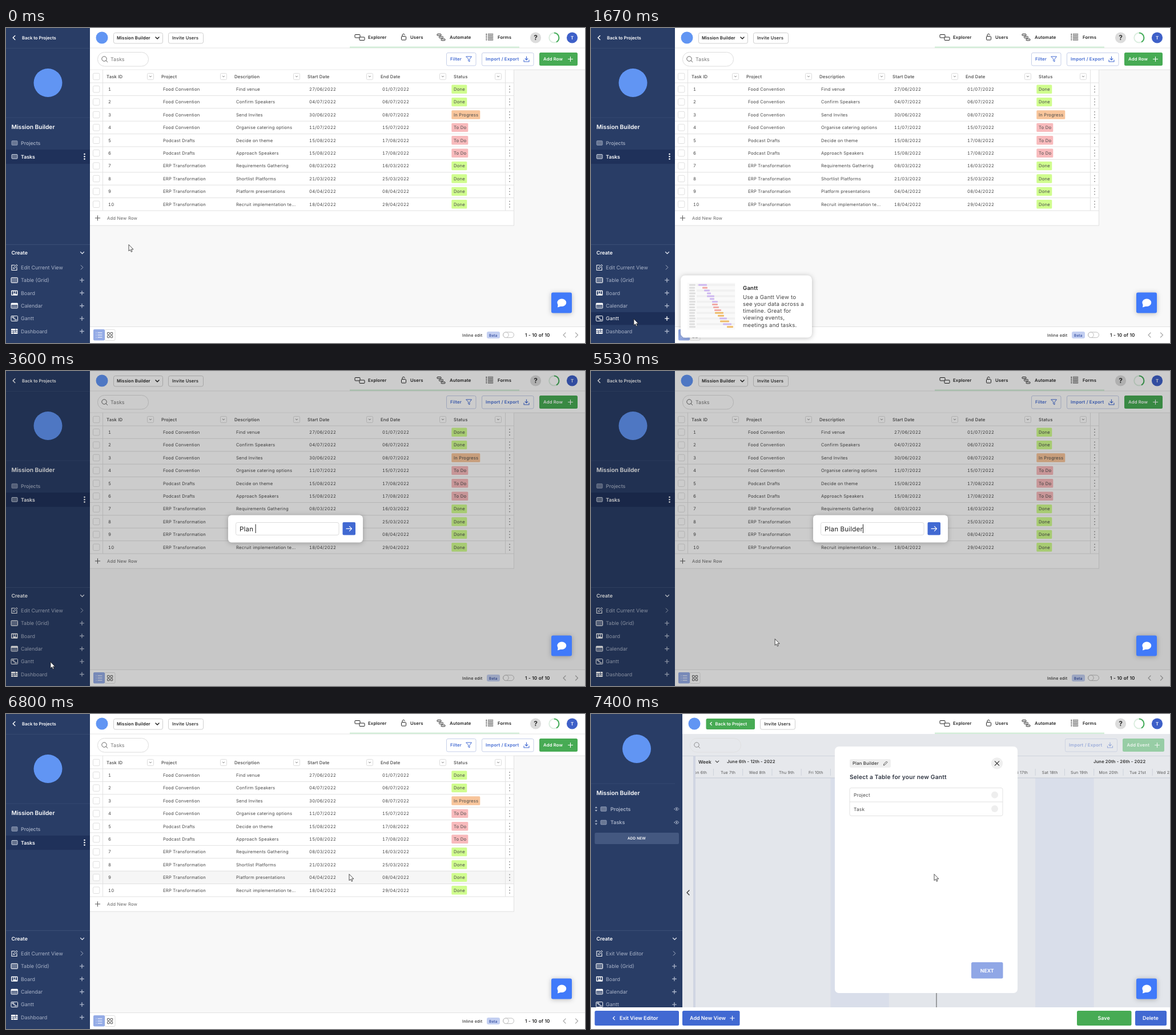
Animation, 1014 px wide and 552 px high, one loop 9070 ms. Source, as an HTML page:

```html
<!DOCTYPE html>
<html lang="en">
<head>
<meta charset="utf-8">
<title>Create a Gantt view</title>
<style>
html, body { margin: 0; width: 100%; height: 100%; overflow: hidden; background: #f8f8f8; }
svg { display: block; width: 1014px; height: 552px; }
text { font-family: Inter, "Liberation Sans", sans-serif; white-space: pre; text-rendering: geometricPrecision; }
.num { font-variant-numeric: tabular-nums; }
.shadow { filter: drop-shadow(0 1px 4px rgba(0, 0, 0, .25)); }
.item { color: #a9b3c8; }
.item.on { color: #fff; }
</style>
</head>
<body>
<svg id="stage" viewBox="0 0 1014 552"></svg>
<script>
const LOOP = 9070, STEP = 200 / 3;
const NAVY = '#293d66', BLUE = '#4169d2', GREEN = '#47ab54', PALE = '#a9b3c8', LINE = '#e2e2e2';
const BRAND = '#6195f3', APP = 'Mission Builder', TYPED = 'Plan Builder';

// Drawing helpers
const text = (x, y, s, size = 7.68, weight = 400, fill = '#484848', ls = .19, anchor = 'start', more = '') =>
  `<text x="${x}" y="${y}" font-size="${size}" font-weight="${weight}" fill="${fill}" letter-spacing="${ls}" text-anchor="${anchor}" ${more}>${s}</text>`;
const rect = (x, y, w, h, fill, r = 0, stroke = 'none', more = '') =>
  `<rect x="${x}" y="${y}" width="${w}" height="${h}" rx="${r}" fill="${fill}" stroke="${stroke}" ${more}/>`;
const circle = (x, y, r, fill, stroke = 'none', more = '') =>
  `<circle cx="${x}" cy="${y}" r="${r}" fill="${fill}" stroke="${stroke}" ${more}/>`;
const path = (d, stroke = '#444', w = 1, fill = 'none') =>
  `<path d="${d}" stroke="${stroke}" stroke-width="${w}" fill="${fill}" stroke-linecap="round" stroke-linejoin="round"/>`;
const group = (body, attrs = '') => `<g ${attrs}>${body}</g>`;
const plus = (x, y, r, c, w = 1.2) => path(`M${x - r} ${y}h${2 * r}M${x} ${y - r}v${2 * r}`, c, w);
const down = (x, y, r, c, w = 1.2) => path(`M${x - r} ${y - r / 2}l${r} ${r}l${r} ${-r}`, c, w);
const side = (x, y, r, dir, c, w = 1.2) => path(`M${x - dir * r / 2} ${y - r}l${dir * r} ${r}l${-dir * r} ${r}`, c, w);
const dots = (x, y, gap, r, c) => [-gap, 0, gap].map(d => circle(x, y + d, r, c)).join('');
const vline = (x, y1, y2, c = LINE) => rect(x, y1, 1, y2 - y1, c);
const hline = (x1, x2, y, c = LINE) => rect(x1, y, x2 - x1, 1, c);
const tray = (x, y, c) => path(`M${x} ${y - 4.5}v6m-2.4 -2.4l2.4 2.4l2.4 -2.4M${x - 4.5} ${y + 1.5}v3h9v-3`, c, 1.1);
const search = x => rect(x + .5, 42.5, 89, 24.5, 'none', 12, '#dcdcdc') +
  circle(x + 12, 54, 4.2, 'none', '#666', 'stroke-width="1"') + path(`M${x + 15.2} 57.2l2.6 2.6`, '#666');
const tableIcon = (x, y, w, h, c) => rect(x, y - h / 2, w, h, 'rgba(255,255,255,.3)', 1, c);

function navBar() {
  const ink = '#222';
  const label = (x, s) => text(x, 19.3, s, 7.68, 600, ink);
  return rect(602, 32.5, 297, 2.5, '#d3edd8') +
    rect(611, 11.5, 9, 5.5, 'none', 1, ink) + rect(619, 16, 9, 5.5, '#fff', 1, ink) + label(634, 'Explorer') +
    rect(692.5, 14.5, 8, 6.5, 'none', 1.2, ink) + path('M694 14.5v-2a2.2 2.2 0 0 1 4.3 -.6', ink) + label(708, 'Users') +
    rect(755, 10.5, 7, 2.8, 'none', 1, ink) + rect(758.5, 14.8, 7, 2.8, 'none', 1, ink) +
    rect(762, 19.1, 7, 2.8, 'none', 1, ink) + label(777, 'Automate') +
    [11, 14.2, 17.4, 20.6].map(y => circle(841.3, y, .9, ink) + rect(844, y - .9, 9, 1.8, '#fff', .9, ink, 'stroke-width=".6"')).join('') +
    label(861, 'Forms') +
    circle(927.5, 17, 9.6, '#dcdcdc') + text(927.5, 21.2, '?', 12, 700, '#333', 0, 'middle') +
    circle(959.8, 17, 8.6, 'none', '#dceee0', 'stroke-width="2"') +
    circle(959.8, 17, 8.6, 'none', '#45ad5a', 'stroke-width="2" pathLength="100" stroke-dasharray="42 100" transform="rotate(-90 959.8 17)"') +
    circle(991.5, 17, 9.6, '#3e60c8') + text(991.5, 19.8, 'T', 7.8, 600, '#fff', 0, 'middle');
}

const createIcons = [
  y => path(`M15 ${y - 4}h-5v9h9v-5`, '#fff', 1.1) + path(`M13 ${y + 2}l.4 -2l5 -5l1.7 1.7l-5 5z`, '#fff', 1),
  y => tableIcon(9, y, 11.5, 9, '#fff'),
  y => rect(9, y - 4.5, 11.5, 9, '#fff', 1) + rect(10.3, y - 3, 2.2, 6, NAVY) + rect(13.6, y - 3, 2.2, 4, NAVY) + rect(16.9, y - 3, 2.2, 5, NAVY),
  y => rect(9, y - 4.5, 11.5, 9, 'none', 1, '#fff') + rect(9, y - 4.5, 11.5, 3, '#fff') +
    [0, 1].map(j => [0, 1, 2, 3].map(i => rect(10.5 + i * 2.4, y - .2 + j * 2.2, 1.4, 1.2, '#fff')).join('')).join(''),
  y => rect(9, y - 4.5, 11.5, 9, 'none', 1, '#fff') + path(`M10.8 ${y - 2.3}h3M12.8 ${y}h3M15.5 ${y + 2.3}h3`, '#fff', 1.4),
  y => rect(9, y - 4.5, 11.5, 9, '#fff', 1) + path(`M9.5 ${y - 1}h10.5M9.5 ${y + 1.7}h10.5M13 ${y - 1}v5M16.5 ${y - 4}v5`, NAVY, .8)
];
function createList(first, right) {
  const names = [first, 'Table (Grid)', 'Board', 'Calendar', 'Gantt', 'Dashboard'];
  return hline(0, right + 14, 379, '#3b4f76') + text(9.5, 397, 'Create', 8.8, 600, '#fff', 0) +
    group(down(right + .5, 394, 3, '#dfe4ee'), 'class="sr"') +
    names.map((s, i) => {
      const y = 419.5 + i * 22.4;
      const mark = i ? plus(right, y, 3.3, 'currentColor', 1.4) : side(right, y, 3.6, 1, 'currentColor', 1);
      return group(createIcons[i](y) + text(26, y + 3.2, s, 8.96, 400, 'currentColor', 0) + group(mark, 'class="sr"'), 'class="item"');
    }).join('');
}

function tableView() {
  const F = 'Food Convention', P = 'Podcast Drafts', E = 'ERP Transformation';
  const rows = [
    [F, 'Find venue', '27/06', '01/07', 0], [F, 'Confirm Speakers', '04/07', '06/07', 0],
    [F, 'Send Invites', '30/06', '08/07', 1], [F, 'Organise catering options', '11/07', '15/07', 2],
    [P, 'Decide on theme', '15/08', '17/08', 2], [P, 'Approach Speakers', '15/08', '17/08', 2],
    [E, 'Requirements Gathering', '08/03', '16/03', 0], [E, 'Shortlist Platforms', '21/03', '25/03', 0],
    [E, 'Platform presentations', '04/04', '08/04', 0], [E, 'Recruit implementation te...', '18/04', '29/04', 0]
  ];
  const chips = [['Done', 27, '#d0fd8e'], ['In Progress', 50, '#f8c59b'], ['To Do', 29, '#f8babc']];
  const heads = [[176, 'Task ID', 253], [272, 'Project', 381], [400, 'Description', 509],
    [528, 'Start Date', 637], [656, 'End Date', 765], [784, 'Status', 862]];
  const box = y => rect(152.5, y - 5.7, 11.4, 11.4, '#fff', 2, '#dedede');

  let s = rect(147, 0, 867, 552, '#f8f8f8') + rect(147, 0, 867, 73, '#fff') + hline(147, 1014, 34.5, '#e6e6e6') + hline(147, 1014, 72.7);
  // Top bar and toolbar
  s += circle(168, 17, 10.5, BRAND) + rect(188.5, 8.5, 86, 18.5, '#fff', 3, '#cfcfcf') + text(194, 20.4, APP, 7.68, 600, '#222', .12) +
    down(265, 17.5, 3, '#222', 1.5) + rect(284.5, 8.5, 61, 18.5, '#fff', 3, '#cfcfcf') + text(291, 20.4, 'Invite Users', 7.68, 600, '#333') +
    navBar() + search(160) + text(183, 57.5, 'Tasks', 8.96, 400, '#777', 0) +
    rect(771.5, 43.5, 51.5, 22.5, '#fff', 2.5, '#c6cfe9') + text(778, 57, 'Filter', 7.68, 600, BLUE) +
    path('M806 50h9.5l-3.6 4.6v4.4l-2.2 -1.4v-3z', BLUE) +
    rect(833.5, 43.5, 90.5, 22.5, '#fff', 2.5, '#c6cfe9') + text(840, 57, 'Import / Export', 7.68, 600, BLUE) + tray(911.5, 54.5, BLUE) +
    rect(934, 43, 67, 23, GREEN, 2.5) + text(941, 57, 'Add Row', 7.68, 600, '#fff') + plus(988.5, 54.5, 4, '#fff', 1.1);
  // Grid
  s += rect(147, 73.5, 743, 272.5, '#fff') + rect(147, 96, 743, 22.4, '#f6f6f6', 0, 'none', 'id="rowHover"') + box(85);
  s += heads.map(([x, h, d]) => text(x, 87.8, h, 7.68, 500, '#444') +
    rect(d - 5.5, 79.5, 11, 11, '#fff', 2, '#dcdcdc') + down(d, 85, 1.6, '#777', 1)).join('');
  rows.forEach(([p, d, a, b, st], i) => {
    const y = 107.2 + i * 22.4, [name, w, c] = chips[st];
    const nums = text(179, y + 2.8, i + 1) + text(531, y + 2.8, a + '/2022') + text(659, y + 2.8, b + '/2022');
    s += hline(147, 890, y - 11.7) + box(y) + group(nums, 'class="num"') + text(275, y + 2.8, p) + text(403, y + 2.8, d) +
      rect(780.3, y - 7.7, w, 15.4, c, 1.5) + text(784, y + 2.8, name, 7.68, 400, '#4d4d4d') + dots(882, y, 5, 1, '#999');
  });
  s += hline(147, 890, 319.6) + hline(147, 890, 345.6) + vline(169, 73, 320) + vline(874, 73, 320) + vline(889, 73, 346) +
    plus(160.5, 333, 4.2, '#555', 1) + text(177, 336, 'Add New Row', 7.68, 400, '#666');
  // Footer
  s += rect(147, 523, 867, 29, '#fff') + hline(147, 1014, 523) + rect(173, 528.5, 18, 19, '#fff', 2, '#e0e0e0') +
    rect(153, 528, 20, 19.5, '#94abe6', 2) + path('M161 534h7M161 538h7M161 542h7M158 534h.1M158 538h.1M158 542h.1', '#fff', 1.2) +
    [[177.5, 533.5], [183, 533.5], [177.5, 539], [183, 539]].map(([x, y]) => rect(x, y, 3.7, 3.7, 'none', .5, '#444', 'stroke-width=".9"')).join('') +
    text(799, 540.6, 'Inline edit', 7.2, 500, '#333') + rect(842, 532, 23, 12, '#c3cff1', 3) + text(846, 540.5, 'Beta', 6.4, 600, '#3c55a5') +
    rect(870.5, 533, 19, 9.6, '#fff', 4.8, '#bdbdbd') + circle(875.5, 537.8, 4.7, '#fff', '#bdbdbd') +
    text(909, 541, '1 - 10 of 10', 8.2, 600, '#222') + side(978, 538, 4, -1, '#aaa') + side(999.5, 538, 4, 1, '#aaa');
  // Sidebar
  s += rect(0, 0, 147, 552, NAVY) + side(14, 17, 3.6, -1, '#fff', 1.4) + text(28, 20.2, 'Back to Projects', 7.68, 600, '#fff', 0) +
    hline(0, 147, 35, '#344970') + circle(73.5, 96, 25, BRAND) + hline(0, 147, 156.5, '#344970') +
    text(9.5, 177, APP, 10.24, 600, '#fff', 0) + rect(0, 213, 147, 25, '#1f315a') +
    tableIcon(10, 201.5, 10, 7.5, '#8e9bb6') + text(26, 204.8, 'Projects', 8.8, 500, PALE, 0) +
    tableIcon(10, 225.3, 10, 7.5, '#c9d1e0') + text(26, 228.5, 'Tasks', 8.8, 600, '#fff', 0) + dots(137.5, 225.3, 4.3, 1.3, '#fff') +
    rect(0, 498, 147, 22.4, '#1d2f57', 0, 'none', 'id="sideHover"') + createList('Edit Current View', 133);
  return s;
}

function hoverCard() {
  const tone = { p: '#ceb8f0', r: '#f1aaa6', o: '#efbc68' };
  const kinds = 'prppppprrroopopo', starts = [188, 195, 198, 203, 203, 208, 212, 212, 214, 216, 217, 222, 225, 226, 231, 238];
  const lens = [15, 9, 10, 7, 13, 8, 10, 10, 10, 12, 15, 11, 13, 16, 15, 11];
  const bars = starts.map((x, i) => {
    const y = 448.8 + i * 4.9;
    return rect(172, y, i % 3 ? 10 : 11, 3, '#dedede', 1) + rect(185, y - .4, 67, 3.8, i % 2 ? '#f9f9f9' : '#f1f1f1') +
      rect(x, y, lens[i], 3, tone[kinds[i]], 1);
  }).join('');
  const lines = ['Use a Gantt View to', 'see your data across a', 'timeline. Great for', 'viewing events,', 'meetings and tasks.'];
  return rect(157, 433.5, 230, 109, '#fff', 8, 'none', 'class="shadow"') + rect(169, 446.5, 83.5, 82, '#fafafa') + bars +
    text(266, 459.3, 'Gantt', 9.6, 600, '#222') + lines.map((l, i) => text(266, 474.5 + i * 12.25, l, 9.6, 400, '#444')).join('');
}

function nameDialog() {
  return rect(0, 0, 1014, 552, '#000', 0, 'none', 'opacity=".2"') +
    rect(389, 252.5, 236, 48, '#fff', 6, 'none', 'class="shadow"') + rect(402.5, 265.5, 180.5, 22, '#fff', 3, '#dcdcdc') +
    text(409, 280.5, '', 11.52, 400, '#333', .19, 'start', 'id="typed"') +
    rect(409, 268.5, 1, 15.5, '#222', 0, 'none', 'id="caret"') +
    rect(589.5, 265, 22.5, 22.5, BLUE, 2, 'none', 'id="go"') + path('M596 276.3h9.5m-4 -4l4 4l-4 4', '#fff', 1.2);
}

function editorView() {
  const day = d => 240 + (d - 7) * 51.25, week = 'Mon Tue Wed Thu Fri Sat Sun'.split(' ');
  const end = d => d + ({ 21: 'st', 22: 'nd' }[d] || 'th');
  let s = rect(140, 0, 874, 552, '#e3e6eb') + rect(140, 35, 874, 77, '#e6e8ec') +
    [11, 18].map(d => rect(day(d) - 25.6, 112, 102.5, 402, '#d9deea')).join('') +
    hline(147, 1014, 73, '#cfd4dd') + hline(183, 1014, 111.5, '#c6cbd5');
  let days = '';
  for (let d = 6; d < 23; d++)
    days += text(day(d), 104.8, `${week[(d - 6) % 7]} ${end(d)}`, 7.04, 400, '#555', .19, 'middle') + vline(day(d) + 25.2, 96, 108, '#cdd2db');
  s += days + text(880, 86, 'June 20th - 26th - 2022', 7.68, 600, '#333', .1) + rect(604.5, 112, 1, 402, '#555');
  s += rect(830.5, 43.5, 91, 22.5, 'none', 2.5, '#cdd3e2') + text(837, 57, 'Import / Export', 7.68, 600, '#9aabd9') + tray(909, 54.5, '#9aabd9') +
    rect(931, 43, 73, 23, '#97cda5', 2.5) + text(938.5, 57, 'Add Event', 7.68, 600, '#eef5f0') + plus(991.5, 54.5, 4, '#eef5f0', 1.1);
  s += rect(140, 0, 874, 35, '#fff') + navBar();
  s += group(rect(155, 74, 24, 440, '#e6e8ec') + rect(179, 74, 4, 440, '#d0d5e2') + side(170, 313, 4, -1, '#333', 1.3) +
    circle(181, 17, 10.5, BRAND) + rect(201.5, 8, 85.5, 19, GREEN, 2.5) + side(210, 17, 2.5, -1, '#fff') +
    text(217.5, 20.2, 'Back to Project', 7.68, 600, '#fff', 0) + rect(296.5, 8.5, 61, 18.5, '#fff', 3, '#cfcfcf') +
    text(303.5, 20.4, 'Invite Users', 7.68, 600, '#333') + group(search(173), 'opacity=".7"') +
    text(188, 87, 'Week', 8.32, 600, '#333', 0) + down(221, 83.5, 2.8, '#444') + text(238, 86, 'June 6th - 12th - 2022', 7.68, 600, '#333', .1), 'class="sr"');
  // Table picker
  s += group(rect(427, 57, 320, 432, '#fff', 7) + rect(453, 79, 72, 15, '#efefef', 3) + text(458, 89.3, TYPED, 7.68, 500, '#333') +
    path('M512.5 89.5l.5 -2l4.5 -4.5l1.6 1.6l-4.5 4.5z', '#444', .9) + circle(711, 86.5, 10.2, '#efefef') +
    path('M707.3 82.8l7.4 7.4m0 -7.4l-7.4 7.4', '#333', 1.2) + text(453, 114, 'Select a Table for your new Gantt', 10.24, 600, '#2f3542') +
    rect(453, 129.5, 268, 49, '#fff', 3, LINE) + hline(453, 721, 153.5) +
    ['Project', 'Task'].map((n, i) => text(460, 145.2 + i * 24.4, n, 8.32) + circle(707, 141.7 + i * 24.4, 6, '#eee')).join('') +
    rect(666, 435, 55.5, 28.5, '#90a7e6', 2.5) + text(693.7, 452.7, 'NEXT', 8.7, 700, '#fff', 0, 'middle'), 'id="picker"');
  // Sidebar
  const eye = y => group(path(`M146 ${y}q4 -5.5 8 0q-4 5.5 -8 0z`, PALE, .9) + circle(150, y, 1.3, PALE), 'class="sr"');
  const entry = (n, y) => path(`M6.8 ${y - 1.5}l2.2 -3l2.2 3zM6.8 ${y + 1.5}l2.2 3l2.2 -3z`, 'none', 0, PALE) +
    tableIcon(17, y, 10, 7.5, '#8e9bb6') + text(34, y + 3.3, n, 8.96, 600, PALE, 0) + eye(y);
  s += rect(0, 0, 160, 552, NAVY, 0, 'none', 'class="sw"') + group(circle(80, 61, 25, BRAND), 'class="sc"') +
    hline(0, 147, 121.5, '#344970') + text(9.5, 142, APP, 10.24, 600, '#fff', 0) + entry('Projects', 166.5) + entry('Tasks', 190) +
    rect(6.5, 208, 147.5, 20, '#445880', 2.5, 'none', 'class="sw"') +
    group(text(80, 220.4, 'ADD NEW', 6.4, 600, '#fff', .19, 'middle'), 'class="sc"') + createList('Exit View Editor', 146);
  // Action bar
  const label = (x, l) => text(x, 536.4, l, 8.96, 600, '#fff', 0);
  return s + rect(0, 514, 1014, 38, '#fff') + rect(6.5, 520, 147.5, 26, BLUE, 2.5, 'none', 'class="sw"') +
    group(side(40, 533, 2.8, -1, '#fff') + label(50, 'Exit View Editor'), 'class="sc"') +
    group(rect(160, 520, 100.5, 26, BLUE, 2.5) + label(173, 'Add New View') + plus(247.5, 533, 3.6, '#fff'), 'class="sr"') +
    rect(851, 520, 95.5, 26, GREEN, 2.5) + label(887.5, 'Save') + rect(953, 520, 55, 26, BLUE, 2.5) + label(966, 'Delete');
}

const chat = rect(955, 463.5, 36, 36, '#407afa', 3, 'none', 'class="shadow"') +
  '<ellipse cx="973.3" cy="481.3" rx="7.9" ry="6.7" fill="#fff"/>' + path('M966.8 484l-.8 5.6l6.5 -2.2z', 'none', 0, '#fff');
const arrow = path('M0 0V10.8L2.5 8.5L4.3 12.4L6 11.6L4.3 7.9H7.6Z', '#222', .8, '#fff');

const $ = id => document.getElementById(id);
$('stage').innerHTML = group(tableView(), 'id="table"') + group(hoverCard(), 'id="card"') + group(nameDialog(), 'id="dialog"') +
  group(editorView(), 'id="editor"') + chat + group(arrow, 'id="cursor"');

const all = sel => [...document.querySelectorAll(sel)];
const items = all('#table .item'), shiftFull = all('#editor .sr'), shiftHalf = all('#editor .sc');
const stretch = all('#editor .sw').map(el => [el, +el.getAttribute('width')]);
const set = (el, name, v) => el.setAttribute(name, v);
const show = (el, o) => { set(el, 'opacity', o); el.style.display = o > 0 ? '' : 'none'; };
const ramp = (t, a, b) => Math.min(1, Math.max(0, (t - a) / (b - a)));

const route = [[133, 215, 380], [400, 185, 415], [667, 130, 458], [933, 88, 494], [1133, 75, 510], [2200, 75, 510], [2267, 78, 510],
  [5133, 78, 510], [5333, 190, 495], [5533, 322, 470], [5800, 470, 390], [6067, 555, 305], [6333, 598, 283], [6467, 601, 281]];
const keys = [2800, 3067, 3133, 3267, 3600, 3800, 4000, 4067, 4200, 4267, 4400, 4467];

function pointer(t) {
  const i = route.findIndex(p => p[0] > t);
  if (i === 0) return route[0].slice(1);
  if (i < 0) return route[route.length - 1].slice(1);
  const [t0, x0, y0] = route[i - 1], [t1, x1, y1] = route[i], k = ramp(t, t0, t1);
  return [x0 + (x1 - x0) * k, y0 + (y1 - y0) * k];
}

function draw(t) {
  const [x, y] = pointer(t), open = t >= 1730 && t < 6730, editing = t >= 6860;
  set($('cursor'), 'transform', `translate(${x} ${y})`);
  show($('table'), editing ? 0 : 1);
  show($('editor'), editing ? 1 : 0);
  show($('card'), ramp(t, 870, 1070) * (1 - ramp(t, 1733.4, 1866)));
  show($('dialog'), open ? 1 - ramp(t, 6533, 6733) : 0);

  // Hovered rows
  const over = !open && x < 147 ? Math.floor((y - 408.3) / 22.4) : -1;
  items.forEach((el, i) => el.classList.toggle('on', i === over));
  show($('sideHover'), over >= 0 ? 1 : 0);
  set($('sideHover'), 'y', 408.3 + over * 22.4);
  const row = !open && x > 147 ? Math.floor((y - 96) / 22.4) : -1;
  show($('rowHover'), row >= 0 && row < 10 ? 1 : 0);
  set($('rowHover'), 'y', 96 + row * 22.4);

  // Typing; the caret blink restarts at each key
  const n = keys.filter(k => k <= t + 2).length, last = n ? keys[n - 1] : 1733;
  const typed = $('typed');
  typed.textContent = n ? TYPED.slice(0, n) : 'Enter name...';
  set(typed, 'fill', n ? '#222' : '#757575');
  if (open) set($('caret'), 'x', 409 + (n ? typed.getComputedTextLength() : 0));
  show($('caret'), Math.floor((t - last + 3) / 533) % 2 ? 0 : 1);
  set($('go'), 'fill', t < 2795 ? '#b5c3ee' : t < 2860 ? '#8aa0e2' : BLUE);

  // The editor's sidebar widens from 147 to 160
  show($('picker'), ramp(t, 6800, 6933));
  const k = ramp(t, 7000, 7400), dx = 13 * (k * k * (3 - 2 * k) - 1);
  shiftFull.forEach(el => set(el, 'transform', `translate(${dx} 0)`));
  shiftHalf.forEach(el => set(el, 'transform', `translate(${dx / 2} 0)`));
  stretch.forEach(([el, w]) => set(el, 'width', w + dx));
}

// The picture advances 15 times a second
const start = performance.now();
function tick() {
  const t = (performance.now() - start) % LOOP;
  draw(Math.floor((t + 5) / STEP) * STEP);
  requestAnimationFrame(tick);
}
tick();
</script>
</body>
</html>
```
